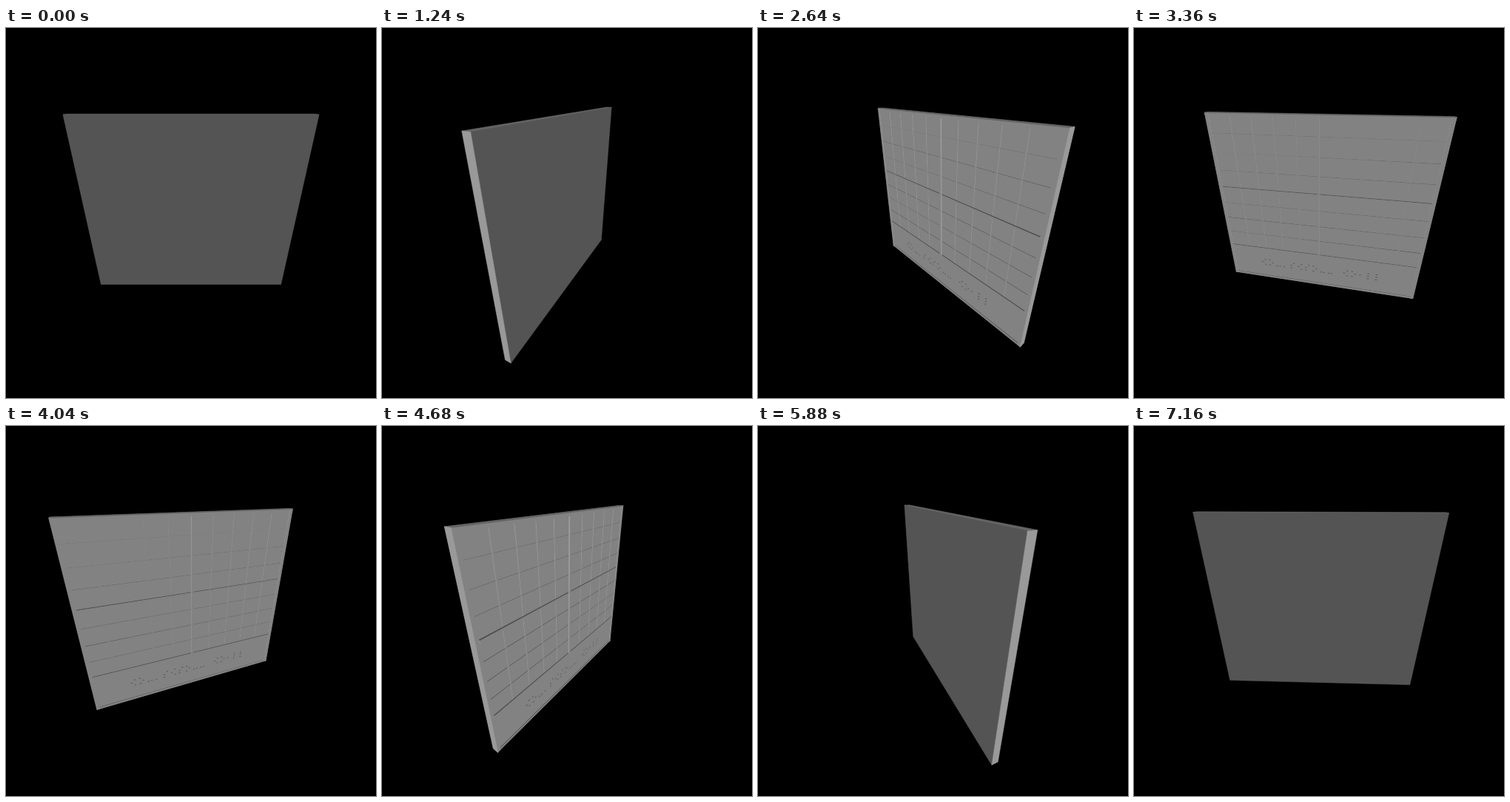
An HTML page with a canvas that plays this animation: 500 px wide and 500 px high, repeating every 7200 ms.

```html
<!DOCTYPE html>
<html>
<head>
<meta charset="utf-8">
<style>
  html, body { margin: 0; width: 100%; height: 100%; overflow: hidden; background: #000; }
  canvas { display: block; }
</style>
</head>
<body>
<canvas id="stage" width="500" height="500"></canvas>
<script>
const ctx = document.getElementById('stage').getContext('2d');
const LOOP = 7200, STEP = 40;

// Camera at distance 1, looking down at the plate; 75 degree field of view
const FOCAL = 250 / Math.tan(37.5 * Math.PI / 180);
const PITCH = Math.atan(0.51);
const SIN_P = Math.sin(PITCH), COS_P = Math.cos(PITCH);

// Plate half sizes, recessed floor, and grid layout
const W = 0.4335, H = 0.38, T = 0.0127, FLOOR = 0.0098;
const COL = 0.084, ROW = 0.0733, AXIS_V = 0.085;
const INNER_U = 0.421, INNER_V = 0.37, BAND_V = -0.208;

const FRONT = '#828282', BACK = '#545454', SIDE = '#999999', TOP = '#656365', LEDGE = '#505050';
const BRAILLE = '⠪⠕⠤⠄⠎⠪⠎⠕⠤⠤⠀⠪⠕⠂⠇⠇';

let sin = 0, cos = 1;

// u: along the plate, v: up, w: out of the front
function project([u, v, w]) {
  const x = -u * cos - w * sin;
  const z = u * sin - w * cos;
  const scale = FOCAL / (1 - v * SIN_P - z * COS_P);
  return [250 + x * scale, 250 - (v * COS_P - z * SIN_P) * scale];
}

function face(points, colour, outline) {
  const p = points.map(project);
  let area = 0;
  p.forEach(([x, y], i) => {
    const [nx, ny] = p[(i + 1) % p.length];
    area += x * ny - nx * y;
  });
  if (area <= 0) return;
  ctx.beginPath();
  p.forEach(([x, y]) => ctx.lineTo(x, y));
  ctx.closePath();
  ctx.fillStyle = colour;
  ctx.fill();
  if (outline) {
    ctx.strokeStyle = colour;
    ctx.lineWidth = 0.5;
    ctx.stroke();
  }
}

function walls(u0, u1, v0, v1, w0, w1, topColour, outline) {
  face([[u0, v1, w0], [u1, v1, w0], [u1, v1, w1], [u0, v1, w1]], topColour, outline);
  face([[u1, v1, w1], [u1, v1, w0], [u1, v0, w0], [u1, v0, w1]], SIDE, outline);
  face([[u0, v1, w0], [u0, v1, w1], [u0, v0, w1], [u0, v0, w0]], SIDE, outline);
}

function frontFace(u0, u1, v0, v1, w, outline) {
  face([[u0, v1, w], [u1, v1, w], [u1, v0, w], [u0, v0, w]], FRONT, outline);
}

function rib(u0, u1, v0, v1, w = T) {
  walls(u0, u1, v0, v1, FLOOR, w, LEDGE);
  frontFace(u0, u1, v0, v1, w);
}

const across = (v, half, w) => rib(-INNER_U, INNER_U, v - half, v + half, w);
const upright = (u, half, w) => rib(u - half, u + half, BAND_V, INNER_V, w);

function grid() {
  for (let k = -3; k <= 3; k++) if (k) across(AXIS_V + k * ROW, 0.002);
  for (let k = -4; k <= 4; k++) if (k) upright(k * COL, 0.002);
  across(BAND_V, 0.003, 0.0145);
  across(AXIS_V, 0.004, 0.0165);
  upright(0, 0.004, 0.0165);
}

function rim() {
  rib(-W, W, INNER_V, H);
  rib(-W, W, -H, -INNER_V);
  rib(-W, -INNER_U, -H, H);
  rib(INNER_U, W, -H, H);
}

function disc(u, v, w, r, colour) {
  const ring = [];
  for (let i = 0; i < 8; i++) {
    const a = i * Math.PI / 4;
    ring.push([u + r * Math.sin(a), v + r * Math.cos(a), w]);
  }
  face(ring, colour);
}

function braille() {
  [...BRAILLE].forEach((cell, i) => {
    const bits = cell.charCodeAt(0) - 0x2800;
    for (let b = 0; b < 6; b++) {
      if (!(bits >> b & 1)) continue;
      const u = -0.277 + i * 0.036 + (b > 2 ? 0.0145 : 0);
      const v = -0.276 - (b % 3) * 0.0145;
      disc(u, v, FLOOR, 0.0042, '#585858');
      disc(u, v - 0.0025, FLOOR + 0.001, 0.0028, '#8a8a8a');
    }
  });
}

function draw(time) {
  const angle = Math.floor(time % LOOP / STEP) * STEP / LOOP * 2 * Math.PI;
  sin = Math.sin(angle);
  cos = Math.cos(angle);
  ctx.fillStyle = '#000';
  ctx.fillRect(0, 0, 500, 500);

  frontFace(-W, W, -H, H, FLOOR, true);
  face([[W, H, -T], [-W, H, -T], [-W, -H, -T], [W, -H, -T]], BACK, true);
  walls(-W, W, -H, H, -T, T, TOP, true);

  // The relief shows only while the camera is in front of the plate
  if (-cos * COS_P > T) {
    grid();
    braille();
    rim();
    walls(-W, W, -H, H, -T, T, TOP, true);
  }
}

const start = performance.now();
function tick() {
  draw(performance.now() - start);
  requestAnimationFrame(tick);
}
tick();
</script>
</body>
</html>
```
